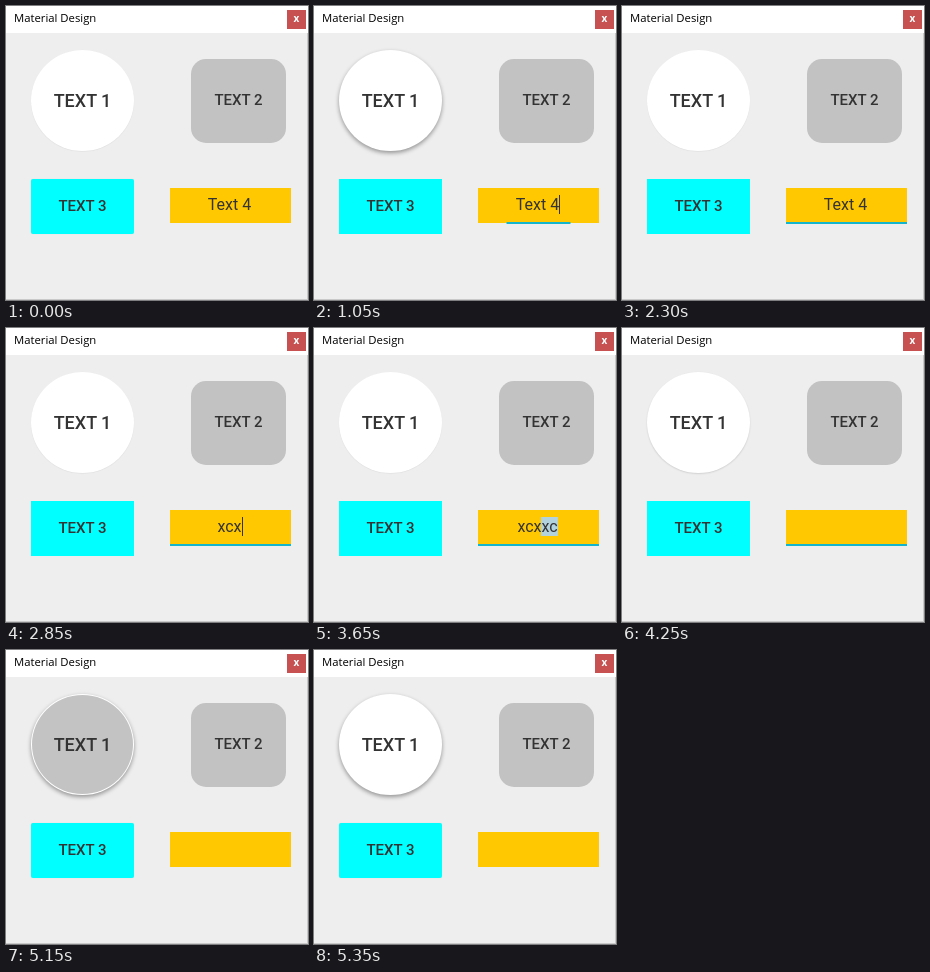
An HTML page that plays this animation: 302 px wide and 294 px high, repeating every 5750 ms.

```html
<!DOCTYPE html>
<html lang="en">
<head>
<meta charset="utf-8">
<title>Material Design</title>
<style>
  html, body { margin: 0; width: 100%; height: 100%; overflow: hidden; }
  #win {
    position: relative; width: 302px; height: 294px; overflow: hidden;
    background: #eee; color: #333; font-family: Roboto, sans-serif;
    --loop: 5750ms linear infinite;
  }
  #win > * { position: absolute; box-sizing: border-box; }
  .bar {
    left: 0; top: 0; width: 302px; height: 27px; padding-left: 8px;
    background: #fff; color: #000;
    font: 11.3px/24px "Open Sans", "Noto Sans", sans-serif;
  }
  .close {
    left: 281px; top: 4px; width: 19px; height: 19px;
    background: #c75050; color: #fff; text-align: center;
    font: bold 10px/17px "Open Sans", sans-serif;
  }
  .edge { inset: 27px 0 0 0; border: solid #c9c9c9; border-width: 0 1px 1px 0; }
  .btn { text-align: center; font-weight: 500; font-size: 15px; white-space: pre; }

  .round {
    left: 25px; top: 44px; width: 103px; height: 101px; border-radius: 50%;
    background: #fff; font-size: 18px; line-height: 101px;
    animation: lift var(--loop);
  }
  .round span { position: relative; }
  .clip { position: absolute; inset: 1px; border-radius: 50%; overflow: hidden; }
  .clip i {
    position: absolute; left: -14px; top: -22px; width: 172px; height: 172px;
    border-radius: 50%; background: #c3c3c3; animation: ripple var(--loop);
  }
  .gray {
    left: 185px; top: 53px; width: 95px; height: 84px; line-height: 83px;
    border-radius: 15px; background: #c2c2c2;
  }
  .cyan {
    left: 25px; top: 173px; width: 103px; height: 55px; line-height: 54px;
    background: #0ff; animation: corner var(--loop);
  }
  .field { left: 164px; top: 182px; width: 121px; height: 35px; background: #ffc800; }
  .line {
    left: 164px; top: 216px; width: 121px; height: 2px; background: #12b5cb;
    animation: focus var(--loop);
  }
  .text {
    left: 164px; top: 189px; width: 119px; height: 19px;
    font-size: 16px; line-height: 19px; text-align: center; white-space: pre;
  }
  #sel { background: #b2d2dd; }
  #caret {
    display: inline-block; width: 0; height: 19px; vertical-align: -4px;
    border-left: 1px solid #333; margin-right: -1px; visibility: hidden;
  }

  @keyframes lift {
    0%, .7%, 22.6%, 73.4% { box-shadow: 0 .5px 1px rgba(0,0,0,.08); }
    4.35%, 18.3%, 75.65%, 100% { box-shadow: 0 2px 4px rgba(0,0,0,.38); }
  }
  @keyframes corner {
    0%, .8%, 89%, 100% { border-radius: 2px; box-shadow: 0 0 1px rgba(0,0,0,.12); }
    4.35%, 86% { border-radius: 0; box-shadow: 0 0 0 rgba(0,0,0,0); }
  }
  @keyframes focus {
    0%, 18.1% { transform: scaleX(0); }
    18.11% { transform: scaleX(.49); animation-timing-function: ease-out; }
    21.8%, 82.43% { transform: scaleX(1); }
    87.65%, 100% { transform: scaleX(0); }
  }
  @keyframes ripple {
    0%, 85.4% { transform: scale(0); opacity: 1; }
    89.3%, 90.4% { transform: scale(1); opacity: 1; }
    92.9%, 100% { transform: scale(1); opacity: 0; }
  }
</style>
</head>
<body>
<div id="win">
  <div class="edge"></div>
  <div class="bar">Material Design</div>
  <div class="close">x</div>
  <div class="btn round"><div class="clip"><i></i></div><span>TEXT 1</span></div>
  <div class="btn gray">TEXT 2</div>
  <div class="btn cyan">TEXT 3</div>
  <div class="field"></div>
  <div class="line"></div>
  <div class="text"><span id="head">Text 4</span><i id="caret"></i><span id="sel"></span></div>
</div>
<script>
  const LOOP = 5750;
  // [time, text, characters selected from the right]
  const edits = [
    [0, "Text 4", 0],
    [2450, "Text 4", 2], [2500, "Text 4", 4], [2550, "Text 4", 6],
    [2750, "x", 0], [2800, "xc", 0], [2850, "xcx", 0],
    [3100, "xcxx", 0], [3150, "xcxxc", 0],
    [3600, "xcxxc", 1], [3650, "xcxxc", 2], [3700, "xcxxc", 3],
    [3750, "xcxxc", 4], [3800, "xcxxc", 5],
    [3850, "", 0]
  ];
  // Caret turns on and off alternately at these times
  const blinks = [1050, 1300, 1550, 1800, 2050, 2300, 2450, 3400, 3600, 4100, 4350, 4600];

  const [head, caret, sel] = ["head", "caret", "sel"].map(id => document.getElementById(id));
  let start, shown;

  function draw(now) {
    start ??= now;
    const t = (now - start) % LOOP;
    const edit = edits.filter(e => e[0] <= t).pop();
    if (edit !== shown) {
      const [, text, picked] = shown = edit;
      const cut = text.length - picked;
      head.textContent = text.slice(0, cut);
      sel.textContent = text.slice(cut);
    }
    const on = blinks.filter(b => b <= t).length % 2;
    caret.style.visibility = on ? "visible" : "hidden";
    requestAnimationFrame(draw);
  }
  requestAnimationFrame(draw);
</script>
</body>
</html>
```
